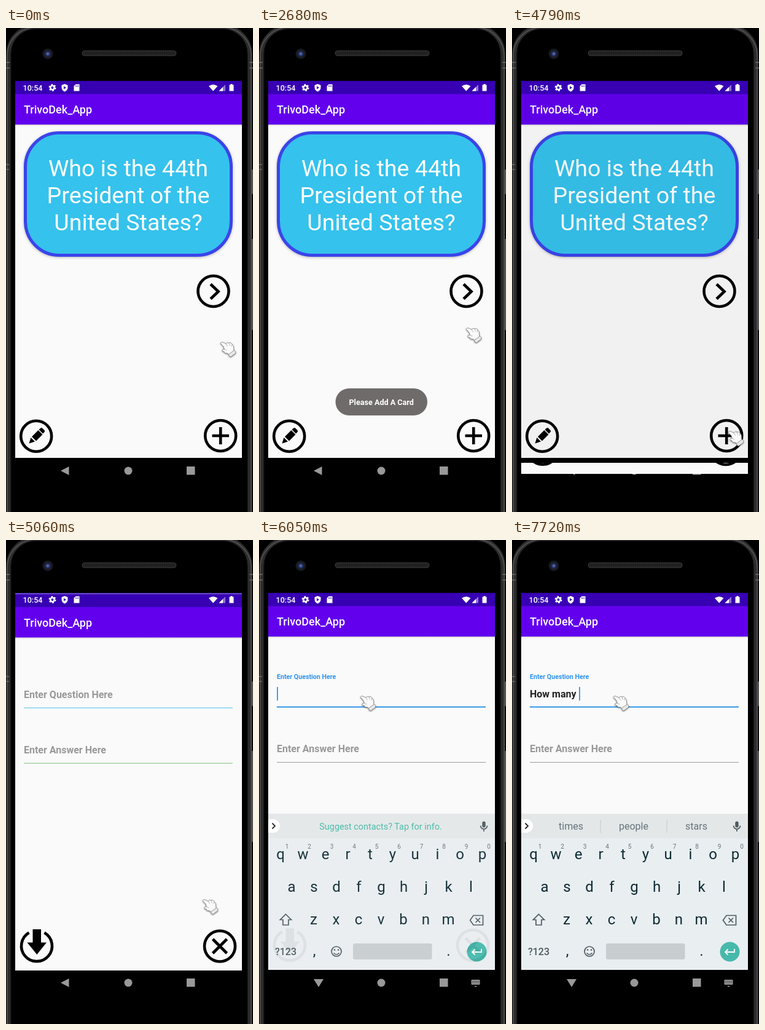
An HTML page for the animation above (8 s loop, 402x787 px).

```html
<!DOCTYPE html>
<html lang="en">
<head>
<meta charset="utf-8">
<title>Flash card app</title>
<style>
html, body { margin: 0; width: 100%; height: 100%; overflow: hidden; background: #000; }
svg { display: block; width: 402px; height: 787px; font-family: Roboto, "Noto Sans", sans-serif; }
.mid { text-anchor: middle; }
.bold { font-weight: 700; }
.ring { fill: none; stroke: #000; stroke-width: 4.6; }
.key { fill: #0d2a33; font-size: 24px; }
.small { fill: #66747a; font-size: 10px; }
.word { fill: #66737a; font-size: 16px; }
.line { fill: none; stroke: #4c5a60; stroke-width: 1.7; }

.anim { animation: 8s step-end -1ms infinite; }
#hand { animation-name: hand; }
#toast { animation-name: toast; }
#home { animation-name: home; }
#dim { animation-name: dim; }
#form { animation-name: rise; }
#board { animation-name: board; }
#label { animation-name: label; transform-origin: 29px 255.5px; }
#qline { animation-name: qline; }
#aline { animation-name: aline; }
#caret { animation-name: type; }
#bar { animation-name: show; }
#down { animation-name: show; }
#back { animation-name: hide; }
#under1 { animation-name: under1; }
#under2 { animation-name: under2; }
#strip { animation-name: strip; }

@keyframes hand {
  0% { transform: translate(348px, 509px); }
  1.875% { transform: translate(354px, 494px); }
  3.375% { transform: translate(353px, 475px); }
  4.875% { transform: translate(350px, 462px); }
  6.75% { transform: translate(343px, 451px); }
  8.25% { transform: translate(338px, 444px); }
  10.125% { transform: translate(338px, 432px); }
  11.625% { transform: translate(338px, 426px); }
  33.5% { transform: translate(336px, 486px); }
  35% { transform: translate(333px, 577px); }
  36.875% { transform: translate(333px, 632px); }
  38.375% { transform: translate(333px, 659px); }
  41.5% { transform: translate(350px, 661px); }
  44.5% { transform: translate(351px, 663px); }
  46% { transform: translate(351px, 659px); }
  47.5% { transform: translate(351px, 654px); }
  61.375% { transform: translate(345px, 638px); }
  63.25% { transform: translate(319px, 583px); }
  64.75% { transform: translate(250px, 466px); }
  66.625% { transform: translate(164px, 301px); }
  68.5% { transform: translate(164px, 265px); }
  70.375%, 100% { transform: translate(164px, 252px); }
}
@keyframes toast {
  0% { opacity: 0; }
  20.125% { opacity: .4; }
  21.625% { opacity: .8; }
  23.5% { opacity: 1; }
  46% { opacity: .72; }
  47.5% { opacity: .3; }
  49.375%, 100% { opacity: 0; }
}
@keyframes home { 0% { visibility: visible; } 61.375%, 100% { visibility: hidden; } }
@keyframes dim { 0% { opacity: 0; } 59.875%, 100% { opacity: .035; } }
@keyframes rise {
  0% { transform: none; }
  59.875% { transform: translateY(26px); }
  61.375% { transform: translateY(13px); }
  63.25% { transform: translateY(1.5px); }
  64.75%, 100% { transform: none; }
}
@keyframes board {
  0% { transform: translateY(43px); opacity: 0; }
  72.25% { transform: translateY(43px); opacity: .3; }
  73.75% { transform: translateY(12px); opacity: .75; }
  75.625% { transform: none; opacity: .95; }
  77.25%, 100% { transform: none; opacity: 1; }
}
@keyframes label {
  0% { transform: none; fill: #999; }
  72.25% { transform: translateY(-14px) scale(.84); fill: #2e93ee; }
  73.75%, 100% { transform: translateY(-29.3px) scale(.667); fill: #2e93ee; }
}
@keyframes qline {
  0% { stroke: #82d2f1; stroke-width: 1.6px; }
  72.25%, 100% { stroke: #2e93e6; stroke-width: 2px; }
}
@keyframes aline {
  0% { stroke: #a3d3a5; stroke-width: 1.6px; }
  72.25%, 100% { stroke: #9c9c9c; stroke-width: 1px; }
}
@keyframes show { 0% { opacity: 0; } 72.25%, 100% { opacity: 1; } }
@keyframes hide { 0% { opacity: 1; } 72.25%, 100% { opacity: 0; } }
@keyframes type {
  0% { transform: none; }
  79.125% { transform: translateX(11.6px); }
  82.5% { transform: translateX(20.6px); }
  86% { transform: translateX(32.5px); }
  87.875% { transform: translateX(36.4px); }
  89.75% { transform: translateX(50.4px); }
  93.125% { transform: translateX(68px); }
  94.625% { transform: translateX(76px); }
  96.5%, 100% { transform: translateX(80px); }
}
@keyframes under1 { 0% { opacity: 1; } 87.875%, 100% { opacity: 0; } }
@keyframes under2 { 0% { opacity: 1; } 96.5%, 100% { opacity: 0; } }
@keyframes strip {
  0% { transform: none; }
  87.875% { transform: translateX(-402px); }
  89.75% { transform: translateX(-804px); }
  91.25% { transform: translateX(-1206px); }
  93.125% { transform: translateX(-1608px); }
  94.625% { transform: translateX(-2010px); }
  96.5%, 100% { transform: translateX(-2412px); }
}
</style>
</head>
<body>
<svg viewBox="0 0 402 787">
  <defs>
    <pattern id="mesh" width="3" height="3" patternUnits="userSpaceOnUse">
      <rect width="3" height="3" fill="#1b1b1b"/><circle cx="1.5" cy="1.5" r=".8" fill="#3a3a3a"/>
    </pattern>
    <radialGradient id="lens">
      <stop offset="0" stop-color="#7d93d8"/><stop offset=".4" stop-color="#2c3a78"/><stop offset="1" stop-color="#14161f"/>
    </radialGradient>
    <linearGradient id="shade" x2="0" y2="1">
      <stop offset="0" stop-color="#000" stop-opacity=".16"/><stop offset="1" stop-color="#000" stop-opacity="0"/>
    </linearGradient>
    <g id="frame">
      <rect x="15" y="86" width="369" height="613" fill="#fafafa"/>
      <rect x="15" y="86" width="369" height="22" fill="#3700b3"/>
      <rect x="15" y="107.5" width="369" height="49.5" fill="#6200ee"/>
      <rect x="15" y="157" width="369" height="3" fill="url(#shade)"/>
      <text x="29" y="139" font-size="18" font-weight="500" fill="#fff">TrivoDek_App</text>
    </g>
  </defs>

  <!-- phone body -->
  <rect width="402" height="787" fill="#000"/>
  <rect x="4" y="-2" width="393" height="900" rx="44" fill="#000" stroke="#2d2d2d" stroke-width="7"/>
  <rect x="2" y="-1" width="397" height="900" rx="46" fill="none" stroke="#565656" stroke-width="1.4"/>
  <rect x="8" y="1.5" width="385" height="900" rx="40" fill="#000" stroke="#191919"/>
  <path d="M0 56h6M0 65h6M396 56h6M396 65h6M0 222h5M0 230h5" stroke="#6b6b6b" stroke-width="1.3"/>
  <path d="M401 230v40M401 343v148" stroke="#555" stroke-width="2"/>
  <circle cx="68" cy="42" r="8.5" fill="#191a1e"/><circle cx="68" cy="42" r="6" fill="url(#lens)"/>
  <rect x="124" y="37" width="153" height="8" rx="4" fill="url(#mesh)" stroke="#3c3c3c"/>

  <!-- navigation -->
  <g fill="#999">
    <path id="back" class="anim" d="M89 720l13.500-7v14z"/>
    <g id="down" class="anim">
      <path d="M89 714h16l-8 13z"/>
      <rect x="345.500" y="715" width="14" height="8" rx="1"/>
      <path d="M347 717.500h11M347 720h11" stroke="#000" stroke-dasharray="1 1"/>
      <path d="M350 725h5l-2.500 2z"/>
    </g>
    <circle cx="199" cy="720" r="6.500"/>
    <rect x="294" y="713" width="13.500" height="13.500"/>
  </g>

  <rect x="15" y="86" width="369" height="22" fill="#3700b3"/>

  <!-- new card form -->
  <g id="form" class="anim">
    <use href="#frame"/>
    <text x="29" y="255.500" font-size="16" class="bold" fill="#222">How many</text>
    <path id="under1" class="anim" d="M29 258.500h32" stroke="#222"/>
    <path id="under2" class="anim" d="M65.500 258.500h39.500" stroke="#222"/>
    <g id="caret" class="anim">
      <rect x="29" y="237" width="84" height="26" fill="#fafafa"/>
      <path id="bar" class="anim" d="M30 239v22" stroke="#2e93ee" stroke-width="1.800"/>
    </g>
    <text id="label" class="anim bold" x="29" y="255.500" font-size="16">Enter Question Here</text>
    <path id="qline" class="anim" d="M29 271.500h340"/>
    <text x="29" y="345" font-size="16" class="bold" fill="#999">Enter Answer Here</text>
    <path id="aline" class="anim" d="M29 361.500h340"/>
    <path class="ring" d="M37.500 637a25 25 0 1 0 25 0"/>
    <path d="M43.500 631.500h13.500v21.500h9l-15.700 19.500-15.800-19.500h9z"/>
    <circle class="ring" cx="348" cy="659" r="25"/>
    <path class="ring" d="M336.500 647.500l23 23m0-23l-23 23"/>
  </g>

  <!-- question screen -->
  <g id="home" class="anim">
    <use href="#frame"/>
    <rect x="15" y="699" width="369" height="8"/>
    <rect x="31.500" y="170.500" width="335" height="199" rx="55" fill="#35c2ec" stroke="#3a44ea" stroke-width="5"
      style="filter: drop-shadow(0 1.500px 2px rgba(0,0,0,.28))"/>
    <g class="mid" font-size="37.600" fill="#fff">
      <text x="199" y="241">Who is the 44th</text>
      <text x="199" y="285">President of the</text>
      <text x="199" y="329">United States?</text>
    </g>
    <circle class="ring" cx="337.500" cy="428" r="25"/>
    <path class="ring" d="M333 416.500l12.500 12-12.500 12"/>
    <circle class="ring" cx="49.200" cy="663.800" r="25"/>
    <path d="M37.500 675.500l3-9.500 6.500 6.500zM42 664.500l10.500-10.500 7 7-10.500 10.500zM53.500 653l3-2.500q1.500-1 3 .5l3 3q1.500 1.500 0 3l-2.500 2.500z"/>
    <circle class="ring" cx="349.200" cy="663" r="25"/>
    <path class="ring" d="M335.500 663h27.500M349.200 649v28"/>
    <rect id="dim" class="anim" x="15" y="107.500" width="369" height="591.500"/>
  </g>

  <g id="toast" class="anim">
    <rect x="124.500" y="586" width="149.500" height="44" rx="22" fill="#706b6b"/>
    <text x="199.200" y="612.500" font-size="12.600" class="mid bold" fill="#fff">Please Add A Card</text>
  </g>

  <!-- keyboard -->
  <g id="board" class="anim">
    <rect x="15" y="445" width="369" height="254" fill="#e9eef1"/>
    <rect x="15" y="445" width="369" height="40" fill="#e3e7e8"/>
    <g id="strip" class="anim">
      <text x="198" y="471" class="mid" font-size="14.400" fill="#45b9a6">Suggest contacts? Tap for info.</text>
    </g>
    <path d="M15 454h8a11 11 0 0 1 0 22h-8z" fill="#fff"/>
    <path d="M21.500 460.500l4.500 4.500-4.500 4.500" fill="none" stroke="#222" stroke-width="1.800"/>
    <rect x="363.300" y="457.500" width="5.400" height="10" rx="2.700" fill="#4c5a60"/>
    <path class="line" d="M360.500 464.500a5.500 5.500 0 0 0 11 0M366 470v4"/>
    <g id="keys" class="mid"></g>
    <path class="line" d="M43.500 608.500l9 9h-4.500v8.500h-9v-8.500h-4.500z"/>
    <path class="line" d="M349 610.500h15.500v15.500h-15.500l-5.500-7.700zM352.500 614.500l7.500 7.500m0-7.500l-7.500 7.500"/>
    <text x="43.500" y="674.500" class="mid" font-size="16" font-weight="500" fill="#4c5a60">?123</text>
    <circle class="line" cx="126" cy="669" r="8"/>
    <path class="line" d="M121.500 671.500q4.500 5 9 0"/>
    <circle cx="123" cy="666.500" r="1.300" fill="#4c5a60"/><circle cx="129" cy="666.500" r="1.300" fill="#4c5a60"/>
    <rect x="153" y="656" width="128.500" height="26" rx="3" fill="#c8cdd0"/>
    <circle cx="354.500" cy="669.500" r="16" fill="#47b9ab"/>
    <path d="M362 665v5h-15m4.500-4.500l-4.500 4.500 4.500 4.500" fill="none" stroke="#fff" stroke-width="1.900"/>
  </g>

  <!-- status icons -->
  <g fill="#fff">
    <text x="27.500" y="101.500" font-size="12.600" font-weight="500">10:54</text>
    <circle cx="75.500" cy="97" r="3.200" fill="none" stroke="#fff" stroke-width="2.600"/>
    <circle cx="75.500" cy="97" r="5" fill="none" stroke="#fff" stroke-width="2" stroke-dasharray="2.600 2.636"/>
    <path d="M95.500 91l5 2v4q0 4-5 6.500-5-2.500-5-6.500v-4z"/>
    <path d="M94 94.500l4 2.500-4 2.500z" fill="#3700b3"/>
    <path d="M113.500 91.500h6v11h-9v-8z"/>
    <path d="M113.500 93.500v2M115.500 93.500v2M117.500 93.500v2" stroke="#3700b3"/>
    <path d="M330 94.500q7.200-5 14.400 0l-7.200 8z"/>
    <path d="M357 92v10.500h-10.500z" opacity=".45"/>
    <path d="M353 96v6.500h-6.500z"/>
    <path d="M365.500 91h3v1.500h2v10h-7v-10h2z"/>
  </g>

  <!-- glove pointer -->
  <g id="hand" class="anim">
    <g stroke="#858585" stroke-width=".8" stroke-linejoin="round" style="filter: drop-shadow(.8px 1.500px 1px rgba(0,0,0,.5))">
      <path fill="#fafafa" d="M1 3.500Q2 1 5 2L10 4.500Q12 1.500 15 3Q18 1.500 20 5Q23 7 22.500 12L23 16 15 22 12.500 20Q7 20 7 17Q3 17 4 14Q6 13 7.500 13.500L6 9Z"/>
      <path fill="#e9e9e9" d="M14.500 21.500L23.500 15Q27 17 25.500 20L18 25.500Q14.500 25.500 14.500 21.500Z"/>
      <path fill="none" stroke="#a5a5a5" d="M10 4.500l2.500 4M15 3l1.500 4.500M20 5l-1 4M7.500 13.500l4 1.500"/>
    </g>
  </g>
</svg>
<script>
const make = (parent, tag, attrs, text = "") => {
  const el = document.createElementNS("http://www.w3.org/2000/svg", tag);
  for (const name in attrs) el.setAttribute(name, attrs[name]);
  el.textContent = text;
  document.getElementById(parent).append(el);
};

const row = (chars, x, y, cls = "key") =>
  [...chars].forEach((c, i) => make("keys", "text", { x: x + 36.5 * i, y, class: cls }, c));
row("qwertyuiop", 35, 519);
row("1234567890", 45.5, 501.5, "small");
row("asdfghjkl", 53, 572);
row("zxcvbnm", 89, 625);
row(",", 90, 676);
row(".", 308.500, 676);

const suggestions = [
  "are|to|much", "my|many|much", "many|more|many times",
  "man|many|many times", "Many|many|many times", "times|people|stars"
];
suggestions.forEach((set, i) => {
  const left = 402 * (i + 1);
  set.split("|").forEach((word, j) =>
    make("strip", "text", { x: left + 96 + 102 * j, y: 471, class: "word mid" }, word));
  make("strip", "path", { d: `M${left + 144} 455v21m108-21v21`, stroke: "#c3c9cb" });
});
</script>
</body>
</html>
```
